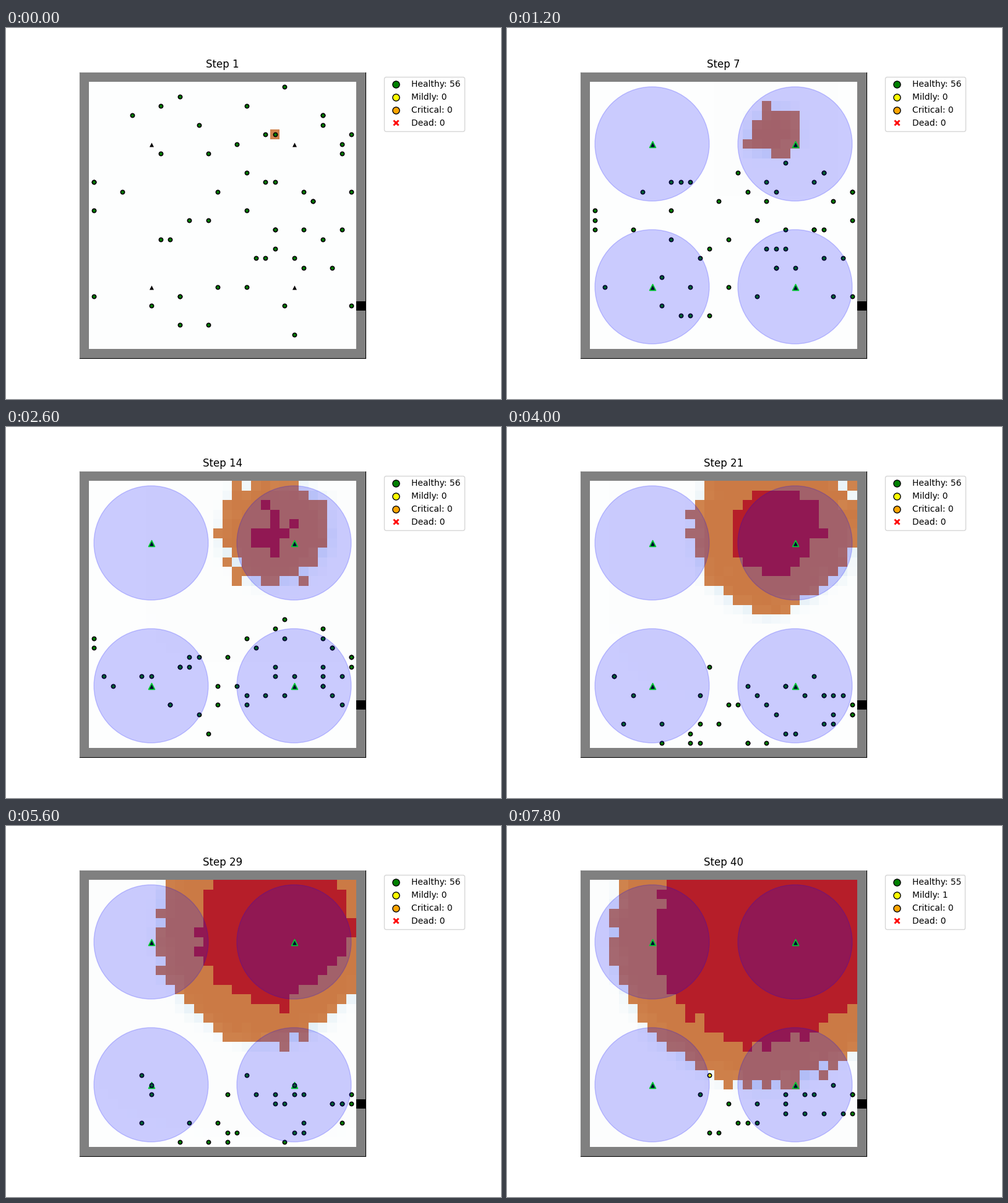
Recreate the animation shown at these times as a matplotlib script. Size 800x600 px, loop 8 s.

```python
import numpy as np
import matplotlib.pyplot as plt
from matplotlib.animation import FuncAnimation
from matplotlib.lines import Line2D
from matplotlib.patches import Circle

SIZE = 30
LAST = 40
PEOPLE = 56
FIRE = np.array([20, 6])
EXIT = np.array([28, 24])
SENSORS = [(7, 7), (22, 7), (7, 22), (22, 22)]
ALARM_STEP = 2
SICK_STEP = 40
FIRE_SPEED, BLAZE_SPEED, BLAZE_START = 0.44, 0.42, 9.5

PAPER = np.array([253, 254, 254]) / 255
SMOKE = np.array([165, 205, 228]) / 255
FRESH = np.array([208, 132, 78]) / 255
FLAME = np.array([203, 122, 69]) / 255
BLAZE = np.array([182, 30, 41]) / 255
rng = np.random.default_rng(11)

rows, cols = np.mgrid[:SIZE, :SIZE]
inside = np.zeros((SIZE, SIZE), bool)
inside[1:-1, 1:-1] = True


# ---------- fire ----------
def reach():
    """Distance the fire must cover; it is slower towards the lower right."""
    dx, dy = cols - FIRE[0], rows - FIRE[1]
    d = np.hypot(dx, dy)
    unit = np.maximum(d, 1)
    down = np.maximum(dy, 0) / unit
    corner = 2 * down * np.maximum(dx, 0) / unit
    return d * (1 + 0.05 * down + 0.13 * corner)


def ragged(d):
    return np.where(d > 0, d + rng.normal(0, 0.42, d.shape), 0)


distance = reach()
lit = 1 + ragged(distance) / FIRE_SPEED
red = BLAZE_START + ragged(distance) / BLAZE_SPEED


def spread_smoke():
    smoke, levels = np.zeros((SIZE, SIZE)), []
    shifts = [(i, j) for i in (-1, 0, 1) for j in (-1, 0, 1) if i or j]
    for s in range(1, LAST + 1):
        around = sum(np.roll(smoke, k, (0, 1)) for k in shifts) / 8
        smoke = np.where(inside, 0.7 * smoke + 0.3 * around, 0)
        levels.append(smoke)
        smoke = np.where(inside & (lit <= s), 1.0, smoke)
    return levels


smoke_at = spread_smoke()


def floor(step):
    img = PAPER + (SMOKE - PAPER) * smoke_at[step - 1][..., None]
    heat = np.clip((step - lit) / 3, 0, 1)[..., None]
    img = np.where((lit <= step)[..., None], FRESH + (FLAME - FRESH) * heat, img)
    img[red <= step] = BLAZE
    img[~inside] = 128 / 255
    img[EXIT[1], SIZE - 1] = 0
    return img


# ---------- people ----------
start = rng.integers(1, SIZE - 1, (PEOPLE, 2)).astype(float)
start = start[np.argsort(np.hypot(*(start - EXIT).T))]
leave = np.arange(1, PEOPLE + 1) / 0.9 + 1     # the nearest get out first
lane = rng.uniform(20.5, 28.4, PEOPLE)
phase = rng.uniform(0, 2 * np.pi, (PEOPLE, 2))


def crowd(step):
    """Everybody runs down to a lane, then along it to the exit."""
    u = np.clip((step - 1) / (leave - 1 + 1e-9), 0, 1)
    x = start[:, 0] + (EXIT[0] - start[:, 0]) * u ** 2
    y = start[:, 1] + (lane - start[:, 1]) * min(1, (step - 1) / 20)
    y += (EXIT[1] - y) * u ** 4
    pos = np.column_stack([x, y])
    if step > 1:
        pos += 0.9 * np.sin(phase + 0.9 * step)
        # keep clear of the flames
        away = pos - FIRE
        d = np.maximum(np.hypot(*away.T), 0.1)
        safe = 1 + 0.92 * FIRE_SPEED * (step - 1)
        pos = FIRE + away * (np.maximum(d, safe) / d)[:, None]
    pos = np.clip(np.round(pos), 1, SIZE - 2)
    return pos[leave > step]


# ---------- stage ----------
fig, ax = plt.subplots(figsize=(8, 6), dpi=100)
fig.subplots_adjust(right=0.75)
ax.set_xticks([])
ax.set_yticks([])
title = ax.set_title("Step 1")
picture = ax.imshow(floor(1), interpolation="nearest", zorder=2.6)
sensors = ax.scatter(*zip(*SENSORS), s=50, marker="^", c="black",
                     edgecolors="white", linewidths=1.25, zorder=2.7)
healthy, mild = (ax.scatter([], [], s=20, facecolors=c, edgecolors="black",
                            linewidths=1.2, zorder=2.8)
                 for c in ("green", "yellow"))
zones = [ax.add_patch(Circle(p, 6, color="blue", alpha=0.2, zorder=3))
         for p in SENSORS]

handles = [Line2D([], [], ls="", marker="o", ms=8, mfc=c, mec="black")
           for c in ("green", "yellow", "orange")]
handles.append(Line2D([], [], ls="", marker="X", ms=8.5, mfc="red", mec="white"))
legend = ax.legend(handles, ["Healthy: 56", "Mildly: 0", "Critical: 0", "Dead: 0"],
                   loc="upper left", bbox_to_anchor=(1.05, 1))


def draw(i):
    step = i + 1
    title.set_text(f"Step {step}")
    picture.set_data(floor(step))

    alarm = step >= ALARM_STEP
    sensors.set_edgecolor("lime" if alarm else "white")
    for z in zones:
        z.set_visible(alarm)

    pos = crowd(step)
    sick = np.zeros(len(pos), bool)
    if step >= SICK_STEP:
        sick[np.hypot(*(pos - FIRE).T).argmin()] = True
    healthy.set_offsets(pos[~sick])
    mild.set_offsets(pos[sick])
    labels = legend.get_texts()
    labels[0].set_text(f"Healthy: {PEOPLE - sick.sum()}")
    labels[1].set_text(f"Mildly: {sick.sum()}")
    return []


anim = FuncAnimation(fig, draw, frames=LAST, interval=200, repeat=True,
                     repeat_delay=0, blit=False)
plt.show()
```
